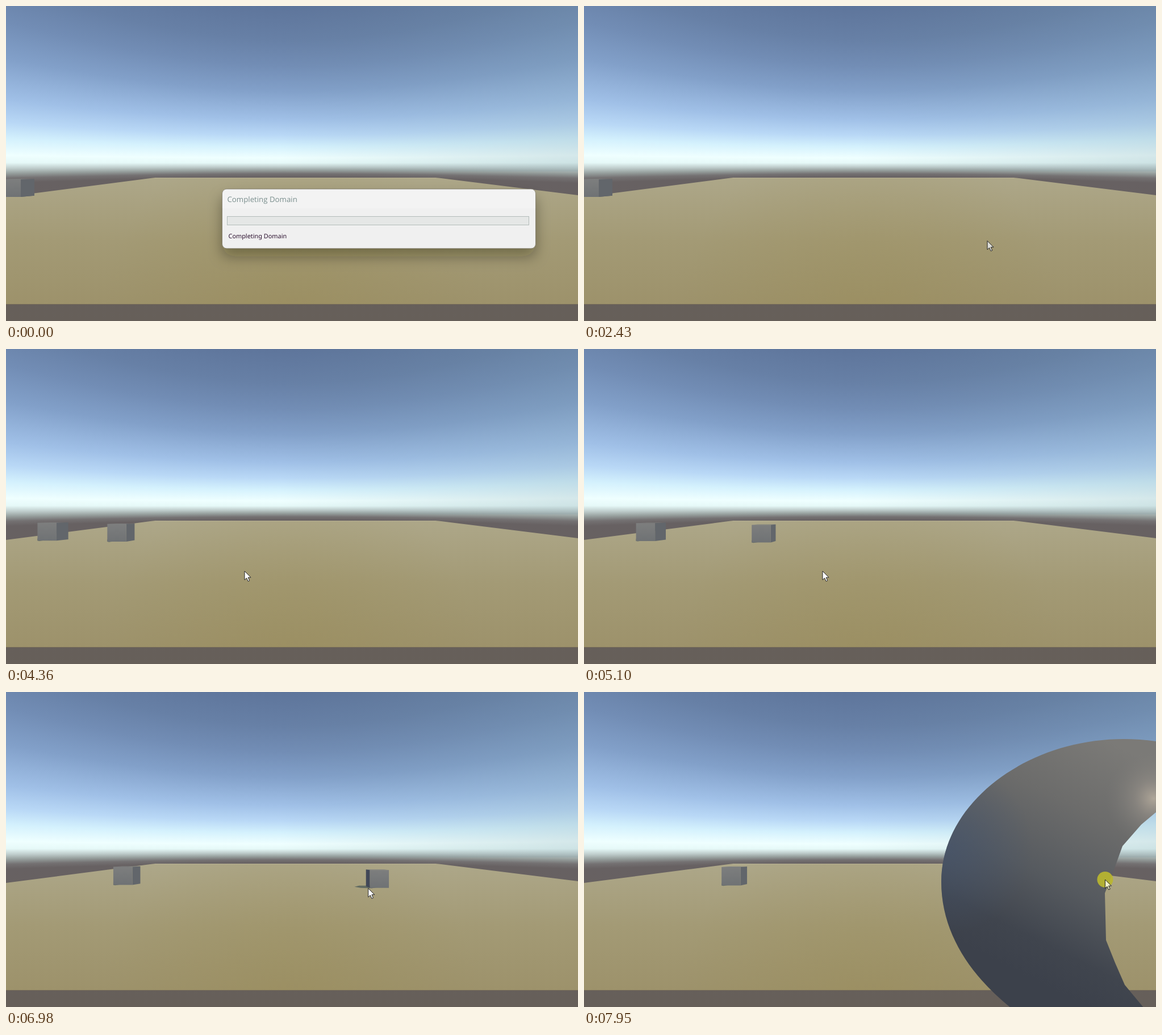
An HTML page with a canvas for the animation above (8000 ms loop, 1007 by 556 pixels).

```html
<!DOCTYPE html>
<html lang="en">
<head>
<meta charset="utf-8">
<title>Scene start</title>
<style>
html, body { margin: 0; width: 100%; height: 100%; overflow: hidden; background: #67605c; }
canvas, svg { position: absolute; left: 0; top: 0; width: 1007px; height: 556px; display: block; }
text { text-rendering: geometricPrecision; }
</style>
</head>
<body>
<canvas id="sky" width="1007" height="556"></canvas>
<svg viewBox="0 0 1007 556">
  <defs>
    <linearGradient id="sand" x1="0" y1="303" x2="0" y2="526" gradientUnits="userSpaceOnUse">
      <stop offset="0" stop-color="#ada789"/>
      <stop offset=".5" stop-color="#a39a75"/>
      <stop offset="1" stop-color="#9d926b"/>
    </linearGradient>
    <radialGradient id="warm" cx="503" cy="550" r="330" gradientUnits="userSpaceOnUse">
      <stop offset="0" stop-color="#998b55" stop-opacity=".4"/>
      <stop offset="1" stop-color="#998b55" stop-opacity="0"/>
    </radialGradient>
    <linearGradient id="front" x1="0" y1="0" x2="0" y2="1">
      <stop offset="0" stop-color="#7d7e7e"/>
      <stop offset="1" stop-color="#6f7274"/>
    </linearGradient>
    <radialGradient id="ball" cx=".62" cy=".27" r=".8">
      <stop offset="0" stop-color="#aaa7a1"/>
      <stop offset=".12" stop-color="#8b8987"/>
      <stop offset=".35" stop-color="#737271"/>
      <stop offset=".62" stop-color="#5c5d60"/>
      <stop offset=".85" stop-color="#42444b"/>
      <stop offset="1" stop-color="#4a4d55"/>
    </radialGradient>
    <linearGradient id="shell" x1="930" y1="90" x2="735" y2="480" gradientUnits="userSpaceOnUse">
      <stop offset="0" stop-color="#7b7a77"/>
      <stop offset=".3" stop-color="#6c6c6b"/>
      <stop offset=".6" stop-color="#565a5f"/>
      <stop offset=".85" stop-color="#40454e"/>
      <stop offset="1" stop-color="#3c414b"/>
    </linearGradient>
    <radialGradient id="rim" cx="640" cy="275" r="150" gradientUnits="userSpaceOnUse">
      <stop offset="0" stop-color="#46566f" stop-opacity=".65"/>
      <stop offset="1" stop-color="#46566f" stop-opacity="0"/>
    </radialGradient>
    <radialGradient id="glow" cx="1003" cy="188" r="85" gradientUnits="userSpaceOnUse">
      <stop offset="0" stop-color="#b5ab9c" stop-opacity=".9"/>
      <stop offset=".4" stop-color="#98928a" stop-opacity=".5"/>
      <stop offset="1" stop-color="#7b7a77" stop-opacity="0"/>
    </radialGradient>
    <filter id="drop" x="-20%" y="-40%" width="140%" height="220%">
      <feDropShadow dx="0" dy="14" stdDeviation="12" flood-color="#1c1800" flood-opacity=".36"/>
    </filter>
    <path id="shape" fill-rule="evenodd" d="M752 558C680 500 629 425 629 335C629 195 780 83 950 83C1130 83 1270 200 1270 330C1270 425 1240 500 1180 558Z
      M1007 212L981 234L948 272L930 322L917 355L919 438L935 478L952 517L986 558H1080Q1220 330 1007 212Z"/>
  </defs>

  <path d="M262 303H757L1007 334V526H0V337Z" fill="url(#sand)"/>
  <path d="M262 303H757L1007 334V526H0V337Z" fill="url(#warm)"/>
  <path d="M262 303.5H757" stroke="#b9b396" stroke-opacity=".7"/>
  <path d="M0 526.5H1007" stroke="#756c58"/>

  <g id="cubes"></g>

  <ellipse id="shade" fill="#51605f"/>
  <ellipse id="sphere" fill="url(#ball)"/>

  <g id="ring">
    <use href="#shape" fill="url(#shell)"/>
    <use href="#shape" fill="url(#rim)"/>
    <use href="#shape" fill="url(#glow)"/>
  </g>

  <g id="dialog">
    <rect x="380.5" y="323" width="552" height="105" rx="8" fill="#f0f0f0" filter="url(#drop)"/>
    <path d="M380.5 357V331a8 8 0 0 1 8-8H924.5a8 8 0 0 1 8 8V357Z" fill="#f3f3f3"/>
    <rect x="380.5" y="323" width="552" height="105" rx="8" fill="none" stroke="#77725f" stroke-opacity=".8"/>
    <text x="389.5" y="345.5" font-family="'Open Sans', 'Noto Sans', sans-serif" font-size="13.25" fill="#7b8f8e">Completing Domain</text>
    <rect x="389.5" y="371.5" width="531" height="15" fill="#e5e7e6" stroke="#b3bcba"/>
    <text x="391.5" y="410" font-family="'Noto Sans', 'Open Sans', sans-serif" font-size="10.9" fill="#2d1230">Completing Domain</text>
  </g>

  <g id="spinner" fill="none" stroke-width="5">
    <circle r="7.2" stroke="#2b8fe0"/>
    <circle id="arc" r="7.2" stroke="#3fb4f4" stroke-dasharray="16 30"/>
  </g>

  <circle id="click" r="14" fill="#b9b62f" fill-opacity=".93"/>
  <path id="arrow" d="M0 0V15.5L3.6 12.2L6.2 18L8.7 16.9L6.2 11.2H11Z" fill="#fff" stroke="#222" stroke-linejoin="round"/>
</svg>

<script>
const LOOP = 8000;
const CX = 503, CY = 278, FOCAL = 481;   // view centre and focal length in pixels
const HORIZON = 292;
const LOADED = 1760, ROLL = 3010;        // dialog closes, cubes set off
const SHOT = 7390, SHOT2 = 7930, STEP = 70;

const $ = id => document.getElementById(id);
const set = (el, attrs) => { for (const k in attrs) el.setAttribute(k, attrs[k]); };
const show = (el, on) => el.setAttribute("visibility", on ? "visible" : "hidden");
const place = (el, x, y) => el.setAttribute("transform", `translate(${x} ${y})`);
const mix = (a, b, p) => a + (b - a) * p;
function ease(t, from, to) {
  const p = Math.min(1, Math.max(0, (t - from) / (to - from)));
  return p * p * (3 - 2 * p);
}

// Lines of equal elevation bend away from the horizon towards the sides.
function paintSky() {
  const c = $("sky").getContext("2d");
  const stops = [
    [0, "#5e759b"], [60, "#6780a6"], [105, "#728db5"], [150, "#82a0c9"],
    [200, "#a0c0e7"], [228, "#b9d8f6"], [248, "#d4f1fd"], [268, "#efffff"],
    [277, "#e6f9f8"], [284, "#bfcdcc"], [290, "#97a09e"], [296, "#747172"], [302, "#676162"]
  ];
  for (let x = 0; x < 1007; x++) {
    const s = Math.hypot(1, (x - CX) / FOCAL);
    const top = CY - CY * s;
    const g = c.createLinearGradient(0, top, 0, 556);
    for (const [y, col] of stops) g.addColorStop((y * s) / (556 - top), col);
    g.addColorStop(1, "#665f59");
    c.fillStyle = g;
    c.fillRect(x, 0, 1, 556);
  }
  const haze = c.createLinearGradient(480, 0, 1007, 0);
  haze.addColorStop(0, "rgba(105,138,150,0)");
  haze.addColorStop(1, "rgba(105,138,150,.2)");
  c.fillStyle = haze;
  c.fillRect(480, 0, 527, HORIZON);
}

function makeCube() {
  const parts = ["#626b62", "#7f8180", "#62666b", "url(#front)"].map(fill => {
    const p = document.createElementNS("http://www.w3.org/2000/svg", "path");
    p.setAttribute("fill", fill);
    $("cubes").appendChild(p);
    return p;
  });
  const poly = (...p) => "M" + p.join(" ") + "Z";
  return (right, top, bottom) => {
    const left = right - 33.5;
    const bx = x => mix(x, CX, .05), by = y => mix(y, HORIZON, .05);
    const shade = Math.max(0, (left - 300) * .08);
    const edge = left > CX ? left : right;
    const faces = [
      poly(left + 3, bottom + .7, left - shade * .6, bottom, left - shade, bottom - 2, left - shade * .7, bottom - 4, right, bottom - 4),
      poly(left, top, right, top, bx(right), by(top), bx(left), by(top)),
      poly(edge, top, edge, bottom, bx(edge), by(bottom), bx(edge), by(top)),
      poly(left, top, right, top, right, bottom, left, bottom)
    ];
    parts.forEach((p, i) => p.setAttribute("d", faces[i]));
    parts[2].setAttribute("fill", left > CX ? "#414757" : "#62666b");
  };
}
const slowCube = makeCube(), fastCube = makeCube();

const rollTime = t => Math.max(0, t - ROLL) / 1000;
const slowX = u => 26 + 45.1 * u + 1.1 * u * u;
const fastX = u => 26 + 124.3 * u + 9.8 * u * u;

// The ball leaves the camera along the click ray and falls until it meets the ground.
function drawBall(t) {
  const on = t >= SHOT + STEP;
  show($("sphere"), on);
  show($("shade"), on);
  if (!on) return;
  const s = (t - SHOT) / 1000;
  const depth = 1 + 17.9 * s, ground = 862;
  const fall = Math.min(ground - 242, 45 * depth + FOCAL * 4.9 * s * s);
  const x = 791, y = HORIZON + fall / depth;
  const sx = x - .96 * (ground - fall) / depth, sy = HORIZON + ground / depth;
  set($("sphere"), { cx: x, cy: y, rx: 275 / depth, ry: 235 / depth, transform: `rotate(17 ${x} ${y})` });
  set($("shade"), { cx: sx, cy: sy, rx: 266 / depth, ry: 65 / depth, transform: `rotate(8 ${sx} ${sy})` });
}

// Pointer hops: start, end, x, y. Afterwards it runs ahead of the fast cube.
const hops = [
  [390, 1150, 529.5, 189.3],
  [LOADED, 2030, 400, 410],
  [2030, 2770, 951, 418],
  [2780, 3050, 280, 392],
  [3080, 3610, 420, 392]
];
function pointer(t) {
  let x = 887, y = 518;
  for (const [from, to, hx, hy] of hops) {
    const p = ease(t, from, to);
    x = mix(x, hx, p);
    y = mix(y, hy, p);
  }
  const chase = ease(t, 6150, SHOT);
  return [mix(x, fastX(rollTime(t)) + 38, chase), mix(y, 331, chase)];
}

function draw(t) {
  const busy = t < LOADED;
  const [x, y] = pointer(t);
  show($("dialog"), busy);
  show($("spinner"), busy && t >= 390);
  place($("spinner"), x, y);
  $("arc").setAttribute("transform", `rotate(${t * .36 - 677})`);

  const u = rollTime(t);
  slowCube(slowX(u), 306 + .6 * u, 337 + .9 * u);
  fastCube(fastX(u), 306 + 2.1 * u, 337 + 2.2 * u);
  drawBall(t);

  const first = t >= SHOT && t < SHOT + STEP, second = t >= SHOT2;
  show($("ring"), first || second);
  place($("ring"), first ? -110 : 0, 0);

  show($("arrow"), !busy);
  place($("arrow"), x, y);
  $("arrow").setAttribute("fill", second ? "#f1f0c4" : t < 3200 ? "#deded8" : "#fff");
  show($("click"), (t >= SHOT && t < SHOT + 2 * STEP) || second);
  place($("click"), x, y);
}

paintSky();
const start = performance.now();
function frame() {
  draw((performance.now() - start) % LOOP);
  requestAnimationFrame(frame);
}
draw(0);
requestAnimationFrame(frame);
</script>
</body>
</html>
```
